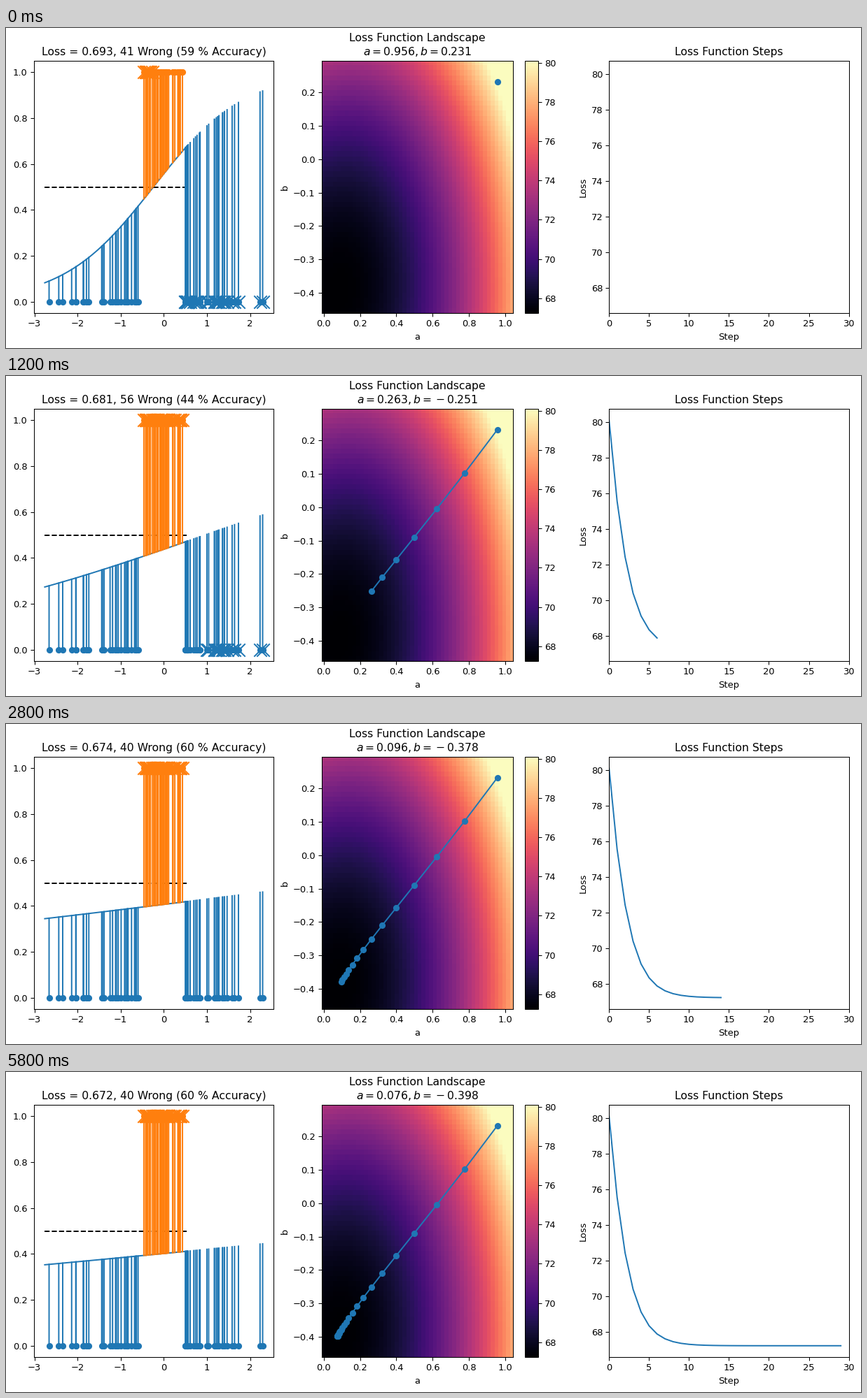
These frames come from a looping animation (1221 by 458 pixels, 6000 ms). A matplotlib script:

```python
import numpy as np
import matplotlib.pyplot as plt
from matplotlib.animation import FuncAnimation

W, H, DPI = 1221, 458, 93.85
STEPS, RATE = 30, 0.01
TOP, BOTTOM = 46.9, 408.2
LEFT, WIDTH = 39.8, 342.28

# Points near zero belong to class 1, all others to class 0
np.random.seed(2)
points = np.random.randn(100)
inner = np.abs(points) < 0.5
x = np.concatenate([points[~inner], points[inner]])
y = np.concatenate([np.zeros((~inner).sum()), np.ones(inner.sum())])
colors = np.where(y == 1, "C1", "C0")


def sigmoid(z):
    return 1 / (1 + np.exp(-z))


def total_loss(a, b):
    z = np.multiply.outer(a, x) + np.asarray(b)[..., None]
    return (np.logaddexp(0, z) - y * z).sum(axis=-1)


def entropy(p):
    return -p * np.log(p) - (1 - p) * np.log(1 - p)


def descend(a, b):
    path = [(a, b)]
    for _ in range(STEPS - 1):
        err = sigmoid(a * x + b) - y
        a, b = a - RATE * (err * x).sum(), b - RATE * err.sum()
        path.append((a, b))
    return np.array(path)


def padded(values, share):
    lo, hi = values.min(), values.max()
    return lo - share * (hi - lo), hi + share * (hi - lo)


path = descend(0.956, 0.231)
losses = total_loss(path[:, 0], path[:, 1])

# The tiny margin keeps the pixel size from rounding down
fig = plt.figure(figsize=((W + 1e-6) / DPI, (H + 1e-6) / DPI), dpi=DPI)


def add_panel(left, width):
    return fig.add_axes([left / W, 1 - BOTTOM / H, width / W, (BOTTOM - TOP) / H])


pitch = 1.2 * WIDTH
fit_ax = add_panel(LEFT, WIDTH)
map_ax = add_panel(LEFT + pitch, 0.8 * WIDTH)
bar_ax = add_panel(LEFT + pitch + 0.85 * WIDTH, (BOTTOM - TOP) / 20)
loss_ax = add_panel(LEFT + 2 * pitch, WIDTH)

# Fitted curve with residual stems
lo, hi = x.min() - 0.1, x[y == 1].max() + 0.1
curve_x = np.linspace(lo, hi, 100)
curve, = fit_ax.plot(curve_x, sigmoid(curve_x), "C0")
fit_ax.plot([lo, hi], [0.5, 0.5], "k--")
stems = [fit_ax.plot([xi, xi], [yi, yi], color=c, snap=False)[0]
         for xi, yi, c in zip(x, y, colors)]
crosses = []
for label, color in enumerate(("C0", "C1")):
    own = y == label
    fit_ax.plot(x[own], y[own], "o", color=color)
    crosses.append(fit_ax.scatter([], [], s=200, marker="x", color=color))
fit_ax.set_xlim(padded(np.array([lo, x.max()]), 0.05))
fit_ax.set_ylim(-0.05, 1.05)
fit_title = fit_ax.set_title("")

# Loss landscape
a_lim, b_lim = padded(path[:, 0], 0.1), padded(path[:, 1], 0.1)
grid_a, grid_b = np.meshgrid(np.linspace(*a_lim, 50), np.linspace(*b_lim, 50))
image = map_ax.imshow(total_loss(grid_a, grid_b), cmap="magma", origin="lower",
                      extent=(*a_lim, *b_lim), aspect="auto",
                      vmin=losses.min(), vmax=losses.max())
fig.colorbar(image, cax=bar_ax)
trail, = map_ax.plot([], [], "o-", color="C0")
map_ax.set(xlim=a_lim, ylim=b_lim, xlabel="a", ylabel="b")
map_title = map_ax.set_title("")

# Loss history
history, = loss_ax.plot([], [], "C0")
loss_ax.set(xlim=(0, STEPS), ylim=padded(losses, 0.05),
            xlabel="Step", ylabel="Loss", title="Loss Function Steps")


def update(step):
    a, b = path[step]
    p = sigmoid(a * x + b)
    wrong = (p > 0.5) != (y == 1)
    count = wrong.sum()

    curve.set_ydata(sigmoid(a * curve_x + b))
    for stem, pi, yi in zip(stems, p, y):
        stem.set_ydata([pi, yi])
    for label, cross in enumerate(crosses):
        miss = wrong & (y == label)
        cross.set_offsets(np.column_stack([x[miss], y[miss]]))
    # The heading shows the entropy at the last class 1 point
    fit_title.set_text(f"Loss = {entropy(p[-1]):.3f}, {count} Wrong "
                       f"({100 - count} % Accuracy)")

    trail.set_data(path[:step + 1, 0], path[:step + 1, 1])
    map_title.set_text(f"Loss Function Landscape\n$a = {a:.3f}, b = {b:.3f}$")
    history.set_data(np.arange(step + 1), losses[:step + 1])
    return []


anim = FuncAnimation(fig, update, frames=STEPS, interval=200, repeat=True,
                     repeat_delay=0, blit=False)
plt.show()
```
